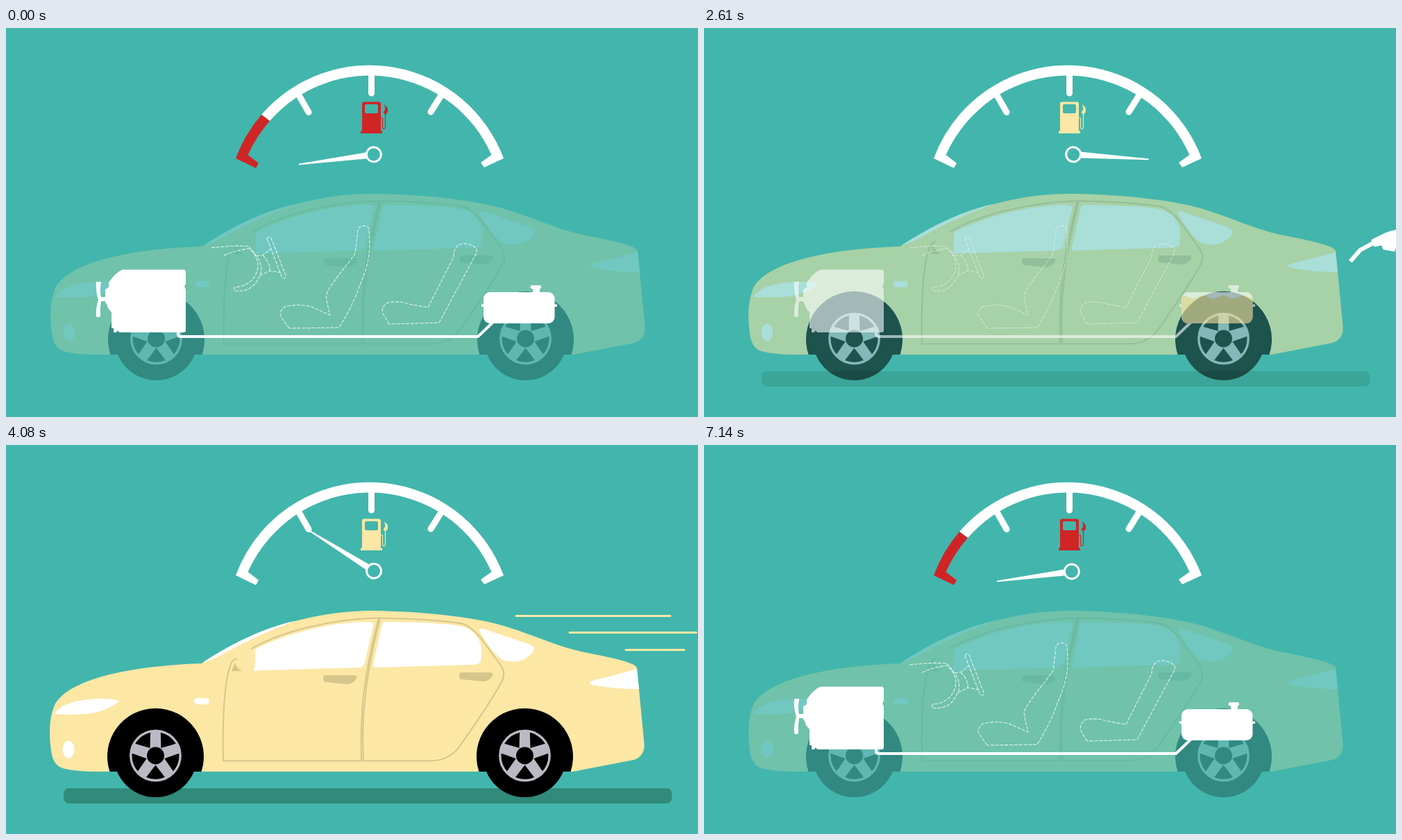
Animation of 997x561 px, one loop 7170 ms. Source, as an HTML page:

```html
<!DOCTYPE html>
<html lang="en">
<head>
<meta charset="utf-8">
<title>Fuel gauge</title>
<style>
html, body { margin: 0; width: 100%; height: 100%; overflow: hidden; background: #42b6ac; }
svg { display: block; width: 997px; height: 561px; }
.w { fill: #fff; }
.line { fill: none; stroke: #fff; stroke-linejoin: round; }
.tan { fill: #d6c68b; }
.seam { fill: none; stroke: #d6c68b; stroke-width: 2; }
</style>
</head>
<body>
<svg viewBox="0 0 997 561">
  <defs>
    <clipPath id="tankClip"><rect x="688" y="381" width="102.500" height="45" rx="9"/></clipPath>
    <g id="wheel">
      <path d="M-66 23A69.500 69.500 0 1 1 66 23Z"/>
      <circle r="60"/>
      <circle r="35.700" fill="none" stroke="#bbbac4" stroke-width="3.400"/>
      <g id="spokes" fill="#bbbac4"></g>
      <circle r="12.500"/>
    </g>
    <path id="handle" class="tan" d="M461 332H503Q507 332 506 337Q500 345 492 345L462 342Q458 342 458 337Q458 332 461 332Z"/>
  </defs>

  <!-- gauge -->
  <path class="w" d="M368 125A206 206 0 0 1 717 188L689 201 684 194 699.500 183A191.500 191.500 0 0 0 380 134Z"/>
  <path id="low" d="M368 125A206 206 0 0 0 331 188L360 202 364 195 348.500 183A191.500 191.500 0 0 1 380 134Z"/>
  <path class="line" stroke-width="9" stroke-linecap="round" d="M526.500 66V94M422 97L436 121.500M627 97L612 121"/>
  <g id="pump">
    <path fill-rule="evenodd" d="M516 106.500H537Q540 106.500 540 109.500V148.500H542V152H511V148.500H513V109.500Q513 106.500 516 106.500ZM519 110Q517 110 517 112V121Q517 123 519 123H534Q536 123 536 121V112Q536 110 534 110Z"/>
    <path d="M545 110L550 115.500V121L547 125 543.500 122 546.500 117Z"/>
    <path id="pumpHose" fill="none" stroke-width="1.200" d="M540 130H542.500V143Q543 146 545 145.500Q546.500 145 546.500 142V123"/>
  </g>
  <g id="needle">
    <path class="w" d="M-11-4.500L-110-.9V.9L-11 4.500Z"/>
    <circle class="line" cx="-1.200" r="10.500" stroke-width="3" style="fill:#42b6ac"/>
  </g>

  <rect id="ground" x="83" y="495" width="876.500" height="22" rx="8" fill="#318b7b"/>

  <g id="move">
    <path id="speed" stroke="#fce7a5" stroke-width="3" stroke-linecap="round" d="M736 246.500H958M813 270.500H995.500M894 295.500H978"/>
    <g id="car">
      <path fill="#fce7a5" d="M66 440C63 420 63 395 70 378C80 350 140 320 283 315C320 290 370 264 417 254C455 244 490 239 530 239C600 240 660 247 700 256C750 268 785 288 830 298C870 306 906 313 910 321L920.500 430Q922 448 906 454L818 471H150Q92 472 78 464Q68 458 66 440Z"/>
      <g class="w">
        <path d="M284 314C320 290 370 264 417 254C380 268 340 286 313 302Q300 309 284 314Z"/>
        <path d="M71 388C80 372 110 366 140 366Q155 366 165 369Q150 382 125 387Q100 390 71 388Z"/>
        <ellipse cx="91" cy="439" rx="8.500" ry="12.500"/>
        <rect x="272.500" y="365" width="21" height="9" rx="4"/>
        <path d="M360 299Q358 296 365 292C400 275 450 260 500 256Q520 254 528 256Q532 257 530 262L518 314Q516 321 509 321L370 325 358 326Q361 312 360 299Z"/>
        <path d="M543 258Q544 255 549 255Q620 256 650 260Q664 262 672 268Q686 280 686 296Q686 312 684 314Q681 317 668 317L534 321Q529 321 530 316Z"/>
        <path d="M683 268Q682 263 689 265L745 284Q760 288 762 293Q762 300 752 306Q744 313 728 312Q718 312 712 307Q700 296 690 280Z"/>
        <path d="M910 323L913 352Q880 352 852 347Q840 345 841 342Q850 338 870 334Z"/>
      </g>
      <path class="seam" d="M354 294C400 268 470 251 538 249.500Q520 320 515 370Q512 410 513 455.500H314Q312 350 325 316Q328 309 334 308"/>
      <path class="seam" d="M538 249.500C590 250 640 254 660 258Q670 261 684 277L712 315Q722 328 716 340Q700 370 655 434Q640 455.500 612 455.500H516Q514 400 518 370Q522 320 540 250"/>
      <path class="tan" d="M331 314Q333 322 341 326H326Z"/>
      <use href="#handle"/>
      <use href="#handle" x="196" y="-4"/>
      <use href="#wheel" x="216.500" y="448"/>
      <use href="#wheel" x="748.500" y="448"/>
    </g>
    <path id="alarm" transform="translate(8)" fill="none" stroke="#c42929" stroke-width="3" stroke-linejoin="round" d="M70 331L107 335 139 317 174 321 206 303 241 307 272 290 310 280 340 253 380 247 414 224 455 226 492 209.500 545 220 599 214.500 650 235 704 237 752 264 806 272 820 290 841 285 857 301 878 294 895 308 916 299"/>
  </g>

  <g id="inside">
    <g class="line" stroke-width="1.100" stroke-dasharray="5 1.800" opacity=".8">
      <path d="M296 317Q330 313 350 315Q356 322 361 329Q371 343 366 357L362 364Q352 382 329 379V374Q352 372 360 355C367 340 360 326 350 318Q330 321 314 328"/>
      <path d="M361 329L371 327 382 318M366 357L380 350 397 353M370 328Q381 339 380 350"/>
      <path d="M376 304Q378 299 382 303L403 357Q404 361 400 361Q398 361 397 358Z"/>
      <path d="M408 433L396 416Q393 408 402 402Q420 397 440 402L467 414Q463 400 461 385C470 365 490 345 503 325L507 292Q508 286 515 285Q524 286 523 293C526 320 522 345 510 370Q500 400 480 432Z"/>
      <path d="M552 427L543 412Q540 402 550 396Q565 393 580 398L608 403 645 330Q645 316 654 312Q665 308 678 318Q679 324 676 328L624 425Z"/>
    </g>
    <path class="line" stroke-width="4" d="M248 436V441Q248 445 252 445H680L703 423"/>
    <path class="w" d="M168 348.500H256Q259 348.500 259 352V369L257 373 259 377V436Q259 439 256 439H163L161 436 159 439H155V433H152V410L147 404 145 398 143 396V377L148 374V367Q158 352 168 348.500Z"/>
    <path class="w" d="M130 366H137Q135 380 137 388H144V394H137Q135 405 136 416Q133 418 130 416Q129 404 133 392Q129 380 130 366Z"/>
    <path class="w" d="M685 398.500H794V402H685ZM759 374H769V383H759Z"/>
    <rect class="w" x="755.500" y="371" width="15.500" height="5" rx="2"/>
    <rect class="w" x="688" y="381" width="102.500" height="45" rx="9"/>
    <path id="fuel" clip-path="url(#tankClip)" fill="#fce4a2"/>
  </g>

  <g id="nozzle">
    <path class="line" stroke-width="6" d="M765 363L779 347 801 335"/>
    <path class="w" d="M795 332L815 322Q832 316 848 316L875 321 873 331 835 330 829 349 812 346 810 340 799 342Z"/>
    <path class="line" stroke-width="7.500" d="M870 325C895 331 925 345 945 361Q956 371 968 371.500Q985 371 997 369H1300"/>
  </g>
</svg>
<script>
const LOOP = 7170, EMPTY = -7.5, FULL = 183.7;
const el = {};
for (const node of document.querySelectorAll('[id]')) el[node.id] = node;

el.spokes.innerHTML = [0, 72, 144, 216, 288]
  .map(a => `<path transform="rotate(${a})" d="M-8-10L-7.300-36H7.300L8-10Z"/>`).join('');

const ramp = (t, a, b) => Math.min(1, Math.max(0, (t - a) / (b - a)));
const ease = (t, a, b) => (1 - Math.cos(Math.PI * ramp(t, a, b))) / 2;
const pulse = (t, a, b, c, d) => ramp(t, a, b) * (1 - ramp(t, c, d));
const mix = (a, b, f) => `rgb(${a.map((v, i) => v + (b[i] - v) * f)})`;
const bump = (t, a, b, c) => ease(t, a, b) - ease(t, b, c);
const fade = (node, v) => node.setAttribute('opacity', v);
const RED = [207, 37, 38], WHITE = [255, 255, 255], CREAM = [252, 231, 165];

function fuelPath(level, t) {
  if (level < .004) return '';
  let d = 'M680 430';
  for (let x = 680; x <= 800; x += 2) {
    const y = 426 - 38 * level + 2.4 * Math.sin((x + t * .05) * .22);
    d += `L${x} ${y.toFixed(2)}`;
  }
  return d + 'V430Z';
}

function draw(t) {
  const level = ease(t, 1405, 2520) - ease(t, 2850, 4610);
  const solid = pulse(t, 2450, 2850, 5630, 6130);
  const ok = pulse(t, 1650, 1950, 4370, 4640);

  el.needle.setAttribute('transform',
    `translate(531 182.300) rotate(${EMPTY + (FULL - EMPTY) * level})`);
  el.low.setAttribute('fill', mix(RED, WHITE, ok));
  const icon = mix(RED, CREAM, ok);
  el.pump.setAttribute('fill', icon);
  el.pumpHose.setAttribute('stroke', icon);

  fade(el.car, .25 + .75 * solid);
  fade(el.inside, 1 - solid);
  fade(el.ground, solid);
  fade(el.speed, pulse(t, 2840, 2980, 4350, 4650));
  fade(el.alarm, pulse(t, 4440, 4560, 5150, 5400));
  const surge = -17 * bump(t, 2940, 3615, 4170) - 14 * bump(t, 4100, 4400, 4900);
  el.move.setAttribute('transform', `translate(${surge})`);

  el.fuel.setAttribute('d', fuelPath(level, t));
  const away = 1 - ease(t, 100, 1100) + ease(t, 2350, 2780);
  el.nozzle.setAttribute('transform', `translate(${250 * away} ${-40 * away})`);
}

const start = performance.now();
function tick() {
  draw((performance.now() - start) % LOOP);
  requestAnimationFrame(tick);
}
tick();
</script>
</body>
</html>
```
